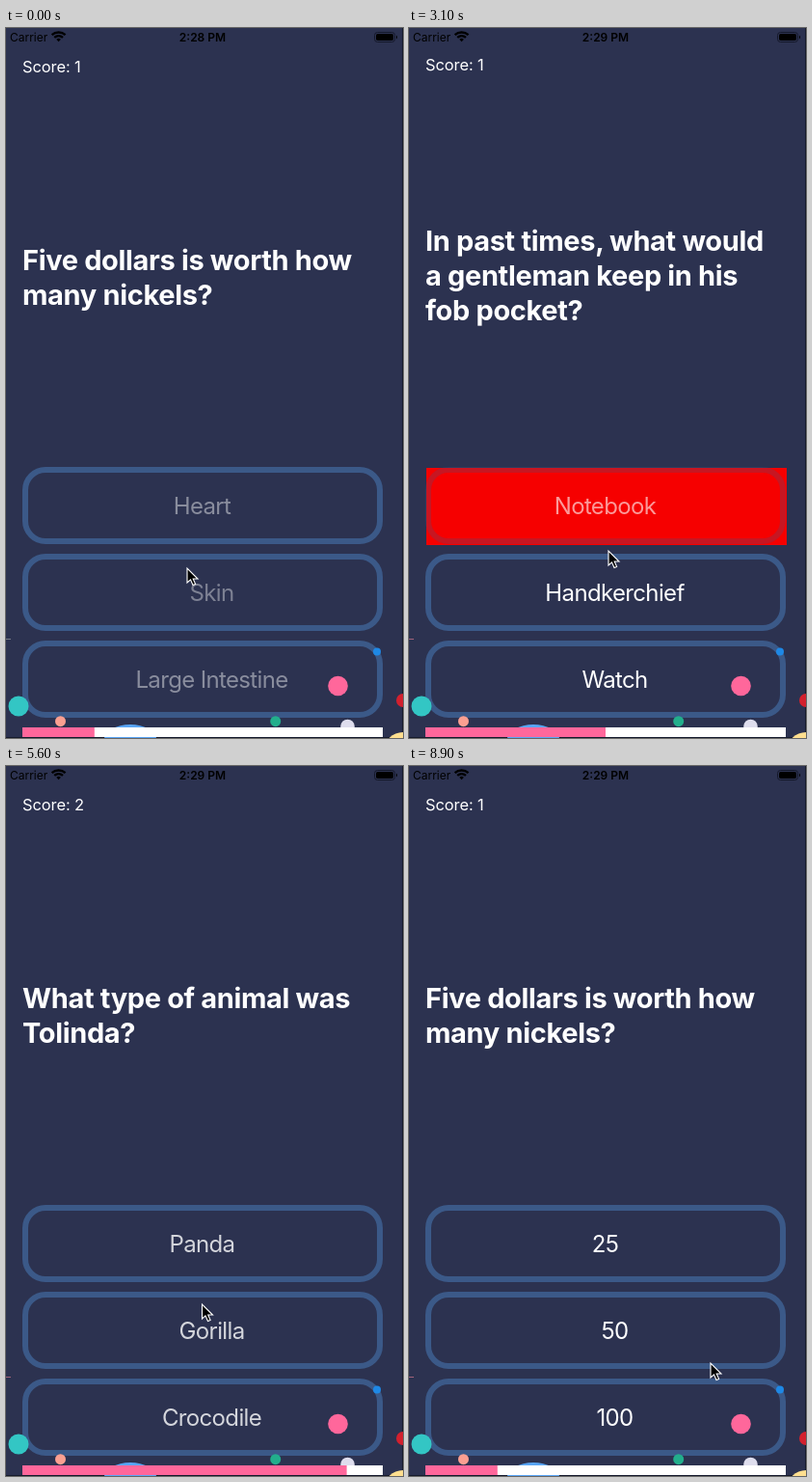
These frames come from a looping animation (412 by 736 pixels, 9 s). An HTML page:

```html
<!DOCTYPE html>
<html lang="en">
<head>
<meta charset="utf-8">
<title>Quiz</title>
<style>
html, body { margin: 0; width: 100%; height: 100%; overflow: hidden; background: #2c3250; }
svg { display: block; width: 412px; height: 736px; }
text { font-family: Inter, "Open Sans", sans-serif; font-optical-sizing: none; fill: #fff; }
.status { font-size: 12px; fill: #000; }
.clock { font-weight: 600; text-anchor: middle; }
.score { font-size: 16.5px; letter-spacing: -.007em; }
.question { font-size: 29px; font-weight: 700; letter-spacing: -.012em; }
.option { font-size: 24px; letter-spacing: -.027em; text-anchor: middle; }
.border { fill: none; stroke: #3b5988; stroke-width: 6px; }
</style>
</head>
<body>
<svg viewBox="0 0 412 736">
  <rect width="412" height="736" fill="#2c3250"/>
  <path d="M411.5 0V736M0 735.5H412" stroke="#151a2c"/>
  <text class="status" x="4" y="14">Carrier</text>
  <g fill="none" stroke="#000" stroke-width="2.3">
    <path d="M47.6 7.2a10.4 10.4 0 0 1 14 0M50.2 9.9a6.6 6.6 0 0 1 8.8 0"/>
    <path d="M54.6 14.2l-2.3-2.5a3.5 3.5 0 0 1 4.6 0z" fill="#000" stroke="none"/>
  </g>
  <text class="status clock" id="clock" x="204" y="14"></text>
  <rect x="382.5" y="4.5" width="21" height="10" rx="3" fill="none" stroke="#14182a"/>
  <rect x="384" y="6" width="18" height="7" rx="1.8"/>
  <path d="M405 7.5q2 2 0 4z"/>
  <text class="score" id="score" x="17"></text>
  <g id="question"></g>
  <g id="options"></g>
  <path id="dash" d="M0 633.5h5"/>
  <g id="confetti">
    <circle cx="13" cy="703" r="10.5" fill="#33c6c4"/>
    <circle cx="56.5" cy="718.7" r="5.5" fill="#fb9f91"/>
    <circle cx="279.7" cy="718.7" r="5.5" fill="#22ae8c"/>
    <circle cx="344.5" cy="682" r="10.3" fill="#ff679b"/>
    <circle cx="354.5" cy="724" r="7.3" fill="#dedded"/>
    <circle cx="385" cy="646.5" r="4" fill="#1e88e5"/>
    <circle cx="412" cy="697" r="7" fill="#d3202e"/>
    <circle cx="412" cy="750" r="20" fill="#ffdf8f"/>
    <ellipse cx="129" cy="737" rx="27" ry="15" fill="#59a5f5"/>
  </g>
  <rect x="17" y="725" width="374" height="10" fill="#fff"/>
  <rect id="progress" x="17" y="725" height="10" fill="#ff679b"/>
  <path id="cursor" d="M0 0V15L3.5 11.8 6 17.5 8.6 16.4 6.2 11H11Z" stroke="#fff" stroke-width="1.1"/>
</svg>
<script>
const LOOP = 9000, STEP = 100;
const PRESS = 300, RELEASE = 200; // lead before the next question appears

const $ = id => document.getElementById(id);
const clamp = v => Math.min(1, Math.max(0, v));
const mix = (a, b, k) => a + (b - a) * k;
const smooth = u => u * u * (3 - 2 * u);

function set(node, attrs) {
  for (const name in attrs) node.setAttribute(name, attrs[name]);
}
function add(parent, tag, attrs) {
  const node = document.createElementNS("http://www.w3.org/2000/svg", tag);
  set(node, attrs);
  return parent.appendChild(node);
}

// Question lines / options / right answer / tapped option
const quiz = [
  ["Which is the largest organ|in the human body?", "Heart|Skin|Large Intestine", "Skin", "Skin"],
  ["Five dollars is worth how|many nickels?", "25|50|100", "100", "50"],
  ["What do the letters in the|GMT time zone stand for?", "Global Meridian Time|Greenwich Mean Time|General Median Time", "Greenwich Mean Time", "General Median Time"],
  ["What is the French word|for ‘hat’?", "Chapeau|Écharpe|Bonnet", "Chapeau", "Écharpe"],
  ["In past times, what would|a gentleman keep in his|fob pocket?", "Notebook|Handkerchief|Watch", "Watch", "Notebook"],
  ["How would one say|goodbye in Spanish?", "Au Revoir|Adiós|Salir", "Adiós", "Adiós"],
  ["Which of these colours is|NOT featured in the logo|for Mavono?", "Green|Orange|Blue", "Orange", "Blue"],
  ["What alcoholic drink is|made from molasses?", "Rum|Whisky|Gin", "Rum", "Whisky"],
  ["What type of animal was|Tolinda?", "Panda|Gorilla|Crocodile", "Gorilla", "Panda"],
  ["Where is Tasmania|located?", "Indonesia|Australia|Scotland", "Australia", "Australia"]
].map(([lines, options, answer, tapped]) => ({
  lines: lines.split("|"), options: options.split("|"), answer, tapped
}));

// The quiz starts over after its last question.
const starts = [-900, -50, 850, 1650, 2400, 3150, 3950, 4650, 5350, 6065, 6850, 7650];
let points = 0;
const rounds = starts.map((start, i) => {
  const index = i % quiz.length, question = quiz[index];
  if (index === 0) points = 0;
  const round = { ...question, start, index, score: points, end: starts[i + 1] ?? Infinity };
  if (question.tapped === question.answer) points++;
  return round;
});

// Time and tip of the pointer
const pointer = [
  [0, 188, 560], [1000, 191, 643], [3100, 207, 542], [4400, 205, 650],
  [5000, 204, 597], [6200, 203, 519], [7400, 202, 570], [LOOP - STEP, 313, 619]
];

const lines = [0, 1, 2].map(() => add($("question"), "text", { class: "question", x: 17 }));
const buttons = [0, 1, 2].map(i => {
  const y = 455 + 90 * i, group = $("options");
  const label = () => add(group, "text", { class: "option", x: i ? 213.5 : 203.5, y: y + 49 });
  return {
    fill: add(group, "rect", { x: 18, y: y + 1, width: 374, height: 80 }),
    border: add(group, "rect", { class: "border", x: 20, y: y + 3, width: 368, height: 74, rx: 21 }),
    before: label(),
    now: label()
  };
});

// 1 at rest, 0 while held, easing back after release
function recovery(round, option, t) {
  const held = option === round.tapped && t >= round.end - PRESS;
  return held ? clamp((t - round.end + RELEASE) / 300) : 1;
}

function pointerAt(t) {
  const i = Math.max(1, pointer.findIndex(key => key[0] >= t));
  const [t0, x0, y0] = pointer[i - 1], [t1, x1, y1] = pointer[i];
  const k = smooth((t - t0) / (t1 - t0));
  return [mix(x0, x1, k), mix(y0, y1, k)];
}

function showLabel(node, text, opacity) {
  node.textContent = text;
  set(node, { opacity });
}

function render(t) {
  const current = rounds.findLastIndex(round => round.start <= t);
  const round = rounds[current], last = rounds[current - 1];
  const age = t - round.start, extra = round.lines.length - 2;
  const verdict = round.tapped === round.answer ? "#00f600" : "#f60000";

  $("clock").textContent = t < 500 ? "2:28 PM" : "2:29 PM";
  $("score").textContent = "Score: " + round.score;
  set($("score"), { y: 46 - 2 * extra });
  lines.forEach((line, i) => {
    line.textContent = round.lines[i] ?? "";
    set(line, { y: 251 - 20 * extra + 36 * i });
  });

  buttons.forEach((button, i) => {
    const option = round.options[i], oldOption = last.options[i];
    const rest = recovery(round, option, t), oldRest = recovery(last, oldOption, t);
    const lit = option === round.tapped && t >= round.end - RELEASE;
    set(button.fill, { fill: lit ? verdict : "none" });
    set(button.border, { opacity: rest ** 2 });
    showLabel(button.before, oldOption, clamp(1 - age / 90) * mix(.2, 1, oldRest));
    showLabel(button.now, option, clamp((age - 50) / 250) * mix(.2, 1, rest));
  });

  set($("dash"), { stroke: t < 2000 ? "#777a86" : "#a0627a" });
  set($("progress"), { width: 374 * (round.index + 1) / quiz.length });
  set($("cursor"), { transform: `translate(${pointerAt(t)})` });
}

const origin = performance.now();
function tick() {
  const t = (performance.now() - origin) % LOOP;
  render(Math.floor(t / STEP) * STEP);
  requestAnimationFrame(tick);
}
tick();
</script>
</body>
</html>
```
